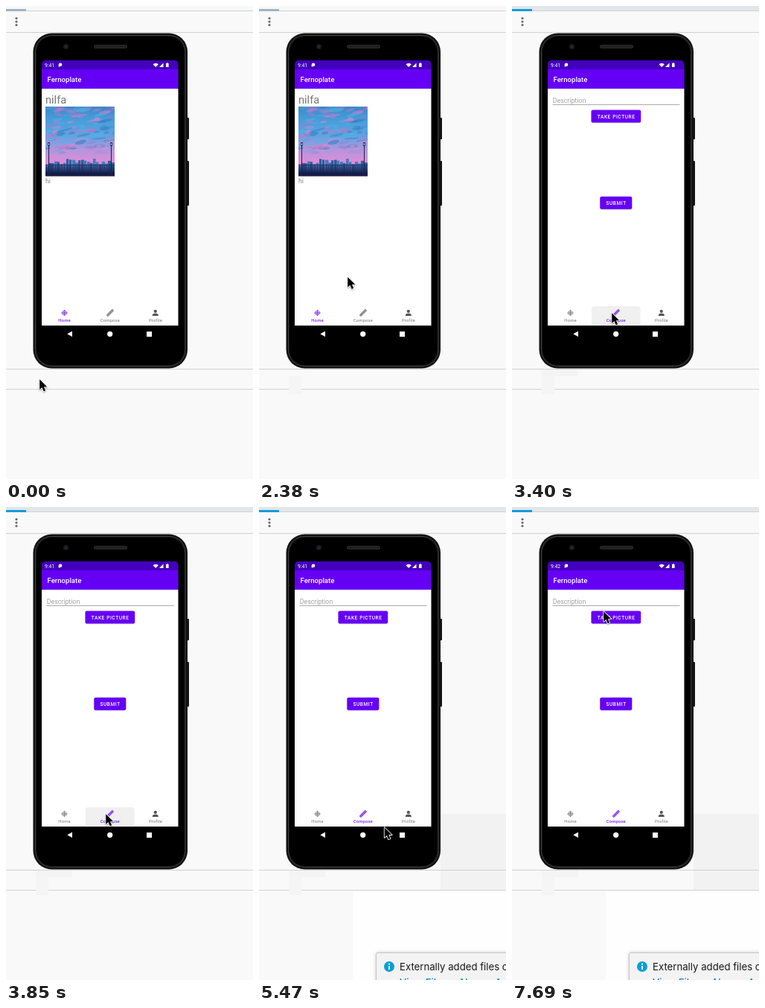
Animation of 332x635 px, one loop 7990 ms. Source, as an HTML page with a canvas:

```html
<!DOCTYPE html>
<html lang="en">
<head>
<meta charset="utf-8">
<title>Phone app demo</title>
<style>
html, body { margin: 0; width: 100%; height: 100%; overflow: hidden; background: #f9f9f9; }
canvas { display: block; width: 332px; height: 635px; }
</style>
</head>
<body>
<canvas id="stage"></canvas>
<script>
const W = 332, H = 635, LOOP = 7990, STEP = 145;
const canvas = document.getElementById('stage');
const ratio = window.devicePixelRatio || 1;
canvas.width = W * ratio;
canvas.height = H * ratio;
const g = canvas.getContext('2d');
const PURPLE = '#6600f5', GREY = '#777';

// Pointer strokes: start time, number of steps, end point
const MOVES = [
  { at: 150, steps: 1, x: 43, y: 483 },
  { at: 900, steps: 4, x: 46, y: 476 },
  { at: 1490, steps: 2, x: 76, y: 317 },
  { at: 2090, steps: 4, x: 132, y: 425 },
  { at: 3100, steps: 1, x: 133, y: 411 },
  { at: 3990, steps: 6, x: 126, y: 433 },
  { at: 5180, steps: 5, x: 195, y: 414 },
  { at: 6510, steps: 4, x: 122, y: 139 }
];

function pointerAt(t) {
  let x = 44, y = 500;
  for (const m of MOVES) {
    if (t < m.at) break;
    const p = Math.min(1, (Math.floor((t - m.at) / STEP) + 1) / m.steps);
    x += (m.x - x) * p;
    y += (m.y - y) * p ** 3;
  }
  return [x, y];
}

function rect(x, y, w, h, color) {
  g.fillStyle = color;
  g.fillRect(x, y, w, h);
}
function round(x, y, w, h, r, color) {
  g.fillStyle = color;
  g.beginPath();
  g.roundRect(x, y, w, h, r);
  g.fill();
}
function dot(x, y, r, color) {
  g.fillStyle = color;
  g.beginPath();
  g.arc(x, y, r, 0, 7);
  g.fill();
}
function poly(points, color) {
  g.fillStyle = color;
  g.beginPath();
  for (const p of points) g.lineTo(...p);
  g.closePath();
  g.fill();
}
function text(s, x, y, size, color, weight = 400, align = 'left', family = 'Roboto', spacing = 0) {
  g.font = `${weight} ${size}px ${family}, sans-serif`;
  g.textAlign = align;
  g.letterSpacing = spacing + 'px';
  g.fillStyle = color;
  g.fillText(s, x, y);
}
function fade(y0, y1, ...colors) {
  const fill = g.createLinearGradient(0, y0, 0, y1);
  colors.forEach((c, i) => fill.addColorStop(i / (colors.length - 1), c));
  return fill;
}
function seeded(seed) {
  return () => (seed = (seed * 16807) % 2147483647) / 2147483647;
}

function drawWindow(t) {
  rect(0, 0, W, H, '#f9f9f9');
  const active = t >= 3100;
  rect(0, 0, W, 6, active ? '#e1e6ea' : '#f7f8f8');
  if (t >= 4290) {
    rect(244, 412, 88, 102, '#f2f2f2');
    rect(126, 515, 206, 120, '#fefefe');
  }
  for (const y of [6, 35, 487, 514]) rect(0, y, W, 1, '#d1d1d1');
  rect(0, 4, 27, 3, active ? '#159bdc' : '#a1b3c4');
  if (t >= 900) rect(40, 497, 17, 24, '#f5f5f5');
  if (active) rect(40, 488, 49, 9, '#f4f4f4');
  for (let i = 0; i < 3; i++) dot(14, 16.5 + i * 4.5, 1.6, '#686868');
}

function drawBody() {
  round(243, 150, 3, 29, 1, '#151515');
  round(243, 208, 3, 60, 1, '#151515');
  round(36.5, 36.5, 207.5, 450, 25, '#111');
  g.strokeStyle = '#3f4143';
  g.lineWidth = 1;
  g.beginPath();
  g.roundRect(39.5, 39.5, 201.5, 444, 22);
  g.stroke();
  round(41, 41, 198.5, 441, 21, '#000');
  dot(80.5, 54.5, 3.5, '#171a20');
  dot(80.5, 54.5, 1.6, '#252c38');
  round(118, 52, 45, 5, 2.5, '#292929');
  for (let x = 120; x < 162; x += 2) rect(x, 53, 1, 3, '#161616');
  poly([[82.3, 440.3], [89, 436.6], [89, 444]], '#fff');
  dot(139.7, 440.3, 3.6, '#fff');
  rect(189, 437, 7, 7, '#fff');
}

function drawBars(t) {
  rect(48, 111, 183.5, 318, '#fff');
  round(48, 73, 183.5, 12, [5, 5, 0, 0], '#4300bd');
  rect(48, 85, 183.5, 26, PURPLE);
  text(t >= 6510 ? '9:42' : '9:41', 52, 81.8, 6.8, '#fff');
  dot(73, 78.7, 2.3, '#fff');
  rect(70.7, 79, 1.6, 2.5, '#fff');
  g.beginPath();
  g.moveTo(201.2, 82);
  g.arc(201.2, 82, 5.3, -2.35, -0.79);
  g.fill();
  poly([[206, 82], [211.5, 82], [211.5, 76.5]], '#fff');
  rect(215, 77, 3.6, 5, '#fff');
  rect(216, 76.2, 1.6, 1, '#fff');
  text('Fernoplate', 55.5, 101.5, 9.6, '#fff', 500);
}

function drawPhoto() {
  g.save();
  g.beginPath();
  g.rect(53, 135, 93, 93.5);
  g.clip();
  rect(53, 135, 93, 94, fade(135, 214, '#3f88c8', '#479fdc', '#60a4e2', '#b695de', '#ea8ad6'));
  const rnd = seeded(41);
  const tones = ['#c27ac8', '#e08bd0', '#4fb2e8', '#8f80cc', '#347fc2'];
  for (let i = 0; i < 110; i++) {
    const y = 135 + rnd() * 62;
    g.globalAlpha = 0.25 + rnd() * 0.4;
    g.fillStyle = tones[i % 5];
    g.beginPath();
    g.ellipse(53 + rnd() * 93, y, 3 + rnd() * 9, 1 + rnd() * 2, -0.3 + rnd() * 0.3, 0, 7);
    g.fill();
  }
  g.globalAlpha = 1;
  // Skyline, tallest towards the middle
  for (let x = 53; x < 146; x += 4) {
    const h = 12 + rnd() * 7 + 5 * Math.sin((x - 53) / 93 * Math.PI);
    rect(x, 228 - h, 3 + rnd() * 2, h, rnd() < 0.5 ? '#3f7dbb' : '#2b60a0');
  }
  rect(53, 212, 93, 17, fade(212, 224, 'rgba(29,44,96,.25)', '#141d48'));
  rect(53, 213, 93, 0.8, '#22356c');
  for (let x = 54; x < 146; x += 3) rect(x, 213, 0.6, 10, '#22356c');
  for (const x of [57.5, 141.5]) {
    rect(x - 0.5, 185, 1, 42, '#1a2451');
    round(x - 1.6, 183, 3.2, 5, 1, '#28305c');
    dot(x, 185.5, 1.1, '#f5b9cb');
  }
  g.restore();
}

function button(label, x, y, w, color) {
  round(x, y + 0.7, w, 17, 2, 'rgba(0,0,0,.18)');
  round(x, y, w, 17, 2, color);
  text(label, x + w / 2 + 0.3, y + 11, 6.5, '#fff', 500, 'center', 'Roboto', 0.62);
}

function drawHome() {
  text('nilfa', 53, 131, 14.6, GREY);
  drawPhoto();
  text('hi', 53, 238, 8.8, '#858585');
}

function drawCompose(t) {
  text('Description', 54.7, 130, 8.8, '#a0a0a0');
  rect(54.5, 132, 171, 0.8, '#979797');
  const pressed = t >= 7240 && t < 7690;
  button('TAKE PICTURE', 106.5, 139.5, 66.7, pressed ? '#7a26f4' : PURPLE);
  button('SUBMIT', 118.3, 255.7, 43, PURPLE);
}

function drawTabs(t, compose) {
  if (compose && t < 3990) round(107, 403, 65.5, 25.5, 4, '#f0f0f0');

  g.strokeStyle = compose ? '#8c8c8c' : '#9444ee';
  g.lineWidth = 1;
  g.beginPath();
  g.arc(78.5, 412, 2.9, 0, 7);
  g.moveTo(74.3, 412);
  g.lineTo(82.7, 412);
  g.moveTo(78.5, 407.8);
  g.lineTo(78.5, 416.2);
  g.stroke();
  dot(78.5, 412, 1.6, g.strokeStyle);

  g.save();
  g.translate(139.8, 412);
  g.rotate(-Math.PI / 4);
  round(-6, -1.7, 12, 3.4, [3, 1.2, 1.2, 3], compose ? '#9852f3' : '#929292');
  g.restore();

  dot(200.8, 409.9, 2.1, '#545454');
  round(196.8, 412.8, 8, 3.3, [3, 3, 0, 0], '#545454');

  const label = (s, x, on) => text(s, x, 424, 5.9, on ? '#7b25f2' : GREY, on ? 500 : 400, 'center', 'Roboto', 0.15);
  label('Home', 78.5, !compose);
  label('Compose', 139.8, compose);
  label('Profile', 201, false);
}

function drawNotice(t) {
  if (t < 4290) return;
  g.save();
  g.globalAlpha = t < 4430 ? 0.5 : 1;
  g.shadowColor = 'rgba(0,0,0,.25)';
  g.shadowBlur = 5 * ratio;
  round(157.5, 598.5, 200, 60, 2, '#f3f3f3');
  g.shadowColor = 'transparent';
  g.strokeStyle = '#c5c5c5';
  g.lineWidth = 1;
  g.stroke();
  dot(175, 617, 7, '#079fd5');
  rect(174.1, 616, 1.9, 5, '#fff');
  rect(174.1, 612.7, 1.9, 1.9, '#fff');
  text('Externally added files can be added', 189, 622, 13.2, '#171717', 400, 'left', 'Inter');
  text('View Files', 189, 642.5, 13.2, '#1286c8', 500, 'left', 'Inter');
  text('Always Add', 268, 642.5, 13.2, '#1286c8', 500, 'left', 'Inter');
  g.restore();
}

function drawPointer(t) {
  const [x, y] = pointerAt(t);
  g.save();
  g.translate(x + 0.7, y + 0.8);
  g.scale(0.94, 0.94);
  g.lineJoin = 'round';
  g.shadowColor = 'rgba(0,0,0,.3)';
  g.shadowBlur = 2 * ratio;
  g.shadowOffsetY = ratio;
  poly([[0.6, 0.6], [0.6, 15], [3.9, 12], [6.4, 17.6], [9, 16.5], [6.6, 11], [11.2, 11]], '#000');
  g.strokeStyle = '#fff';
  g.lineWidth = 1.8;
  g.stroke();
  g.shadowColor = 'transparent';
  g.fill();
  g.restore();
}

function draw(t) {
  g.setTransform(ratio, 0, 0, ratio, 0, 0);
  const compose = t >= 3400;
  drawWindow(t);
  drawBody();
  drawBars(t);
  if (compose) drawCompose(t);
  else drawHome();
  drawTabs(t, compose);
  drawNotice(t);
  drawPointer(t);
}

const start = performance.now();
function tick() {
  draw((performance.now() - start) % LOOP);
  requestAnimationFrame(tick);
}
tick();
</script>
</body>
</html>
```
